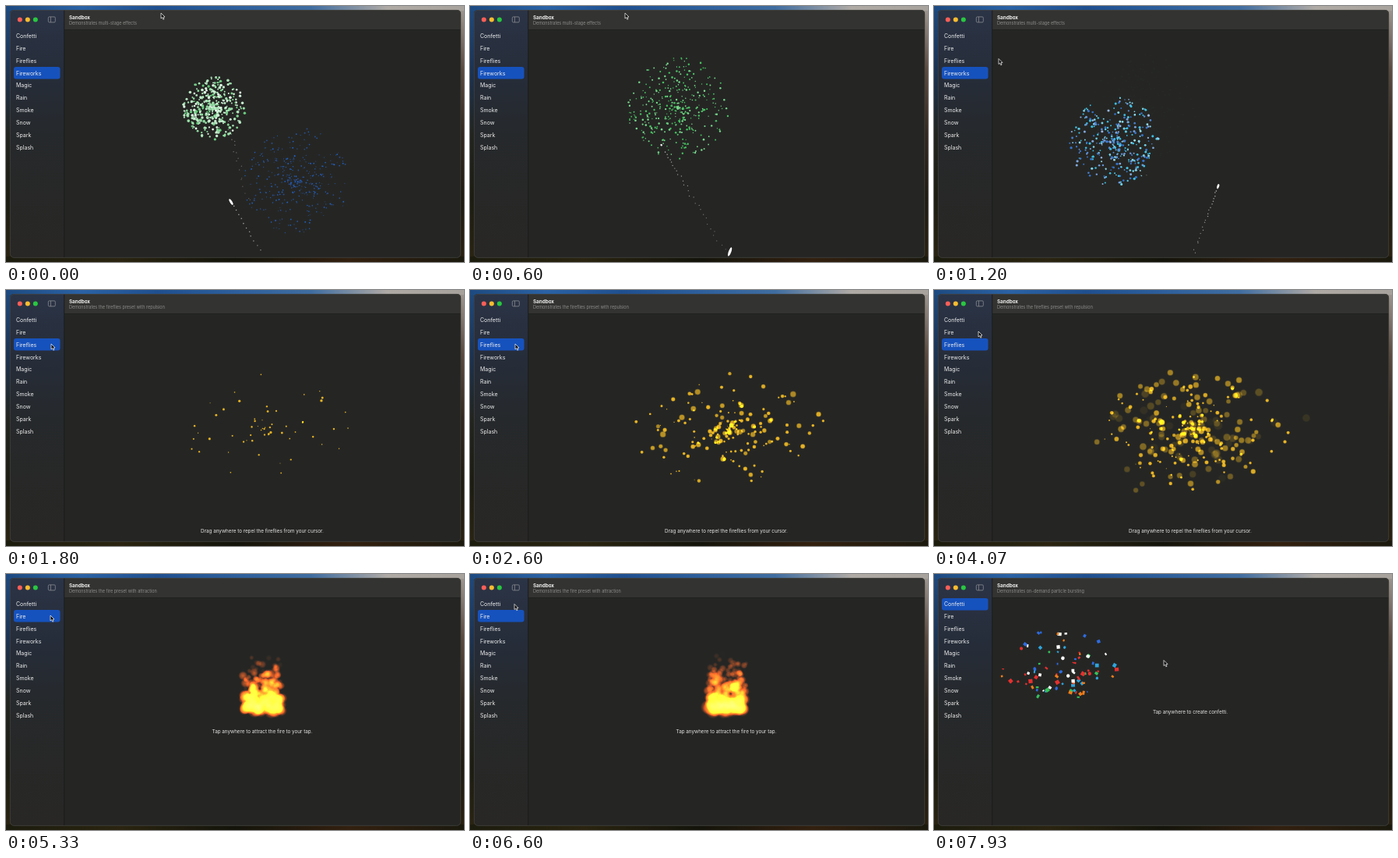
Recreate the animation shown at these times as an HTML page with a canvas. Size 588 by 328 pixels, loop 8000 ms.

```html
<!DOCTYPE html>
<html lang="en">
<head>
<meta charset="utf-8">
<title>Particle sandbox</title>
<style>
  html, body { margin: 0; width: 100%; height: 100%; overflow: hidden; background: #1c1c0e; }
  canvas { display: block; }
</style>
</head>
<body>
<canvas id="stage" width="588" height="328"></canvas>
<script>
const W = 588, H = 328, LOOP = 8000, TAU = Math.PI * 2;
const ctx = document.getElementById('stage').getContext('2d');
const FONT = 'Inter, "Liberation Sans", sans-serif';
const MENU = ['Confetti', 'Fire', 'Fireflies', 'Fireworks', 'Magic', 'Rain', 'Smoke', 'Snow', 'Spark', 'Splash'];

const SCENES = [
  { start: 0, row: 3, sub: 'Demonstrates multi-stage effects', draw: drawFireworks },
  { start: 1400, row: 2, sub: 'Demonstrates the fireflies preset with repulsion', draw: drawFireflies,
    hint: 'Drag anywhere to repel the fireflies from your cursor.', hintY: 309 },
  { start: 4230, row: 1, sub: 'Demonstrates the fire preset with attraction', draw: drawFire,
    hint: 'Tap anywhere to attract the fire to your tap.', hintY: 201.5 },
  { start: 6750, row: 0, sub: 'Demonstrates on-demand particle bursting', draw: drawConfetti,
    hint: 'Tap anywhere to create confetti.', hintY: 177 },
];

// time, x, y of the pointer tip
const POINTER = [
  [0, 199, 9], [930, 199, 9], [1200, 83, 67.5], [1360, 58, 69], [3380, 58, 69], [3600, 57, 53],
  [6300, 57, 53], [6480, 57, 38.5], [7070, 57, 38.5], [7330, 360, 168], [7600, 158, 168], [7900, 295, 110.5],
];

const clamp = (v, lo = 0, hi = 1) => Math.min(hi, Math.max(lo, v));
const lerp = (a, b, k) => a + (b - a) * k;
const rgb = c => `rgb(${c.map(Math.round).join(',')})`;
const mix = (a, b, k) => a.map((v, i) => lerp(v, b[i], k));

// Seeded random number in 0..1 for particle i, property k.
function rnd(i, k) {
  let h = Math.imul(i + 1, 374761393) ^ Math.imul(k + 7, 668265263);
  h = Math.imul(h ^ (h >>> 13), 1274126177);
  h = Math.imul(h ^ (h >>> 16), 2246822519);
  return ((h ^ (h >>> 15)) >>> 0) / 4294967296;
}

function disc(x, y, r, fill) {
  ctx.fillStyle = fill;
  ctx.beginPath();
  ctx.arc(x, y, r, 0, TAU);
  ctx.fill();
}

function box(x, y, w, h, r) {
  ctx.beginPath();
  ctx.roundRect(x, y, w, h, r);
}

function shade(x, y, w, h, colors, vertical) {
  const g = vertical ? ctx.createLinearGradient(0, y, 0, y + h) : ctx.createLinearGradient(x, 0, x + w, 0);
  colors.forEach((c, i) => g.addColorStop(i / (colors.length - 1), c));
  ctx.fillStyle = g;
  ctx.fillRect(x, y, w, h);
}

function label(text, x, y, size, color, weight = 400, align = 'left') {
  ctx.font = `${weight} ${size}px ${FONT}`;
  ctx.textAlign = align;
  ctx.textBaseline = 'alphabetic';
  ctx.fillStyle = color;
  ctx.fillText(text, x, y + size * 0.36);
}

function makeSprite(inner, outer) {
  const c = document.createElement('canvas');
  c.width = c.height = 32;
  const g = c.getContext('2d');
  const fade = g.createRadialGradient(16, 16, 0, 16, 16, 16);
  fade.addColorStop(0, `rgba(${inner},1)`);
  fade.addColorStop(0.55, `rgba(${outer},.75)`);
  fade.addColorStop(1, `rgba(${outer},0)`);
  g.fillStyle = fade;
  g.fillRect(0, 0, 32, 32);
  return c;
}
const flame = makeSprite('165,60,7', '150,44,4');

function stamp(sprite, x, y, r) {
  ctx.drawImage(sprite, x - r, y - r, r * 2, r * 2);
}

/* ---------- fireworks ---------- */

const FLIGHT = 1000;
const SHELLS = [
  { x: 373, y: 224, burst: -1200, colors: [[35, 105, 215], [45, 85, 165]] },
  { x: 267, y: 131, burst: -280, colors: [[70, 190, 95], [120, 215, 140]] },
  { x: 231, y: 173, burst: 640, colors: [[60, 190, 225], [55, 115, 200]] },
  { x: 360, y: 202, burst: 1560, colors: [[230, 90, 90], [240, 150, 150]] },
];

function shellPath(shell, k) {
  const f = 1 - (1 - k) ** 1.5;
  return [lerp(331, shell.x + 14, f), lerp(322, shell.y + 4, f)];
}

function drawTrail(shell, t, seed) {
  const launch = shell.burst - FLIGHT;
  for (let i = 0; i < 28; i++) {
    const k = 0.04 + 0.81 * i / 28;
    const age = (t - launch - k * FLIGHT) / 1020;
    if (age < 0 || age > 1) continue;
    const [x, y] = shellPath(shell, k);
    const spread = 1 + age * 6;
    ctx.globalAlpha = 0.75 * (1 - age * 0.5);
    disc(x + (rnd(i, seed) - 0.5) * spread, y + (rnd(i, seed + 1) - 0.5) * spread, 0.8 - age * 0.25, '#dedede');
  }
}

function drawRocket(shell, t) {
  const k = (t - shell.burst) / FLIGHT + 1;
  if (k < 0 || k >= 1) return;
  const [x, y] = shellPath(shell, k);
  const [px, py] = shellPath(shell, k - 0.02);
  ctx.globalAlpha = 1;
  ctx.fillStyle = '#fff';
  ctx.beginPath();
  ctx.ellipse(x, y, lerp(6.2, 1.2, k), lerp(1.7, 1.2, k), Math.atan2(y - py, x - px), 0, TAU);
  ctx.fill();
}

function drawBurst(shell, t, seed) {
  const age = t - shell.burst, life = age / 1500;
  if (life < 0 || life > 1) return;
  const reach = 70 * (1 - Math.exp(-age / 330));
  for (let i = 0; i < 360; i++) {
    const a = rnd(i, seed) * TAU;
    const r = reach * rnd(i, seed + 1) ** 0.8;
    const tint = clamp(age / 750 + rnd(i, seed + 2) * 0.75 - 0.25);
    const size = 1.65 * (1 - life * 0.65) * (0.6 + 0.7 * rnd(i, seed + 3));
    ctx.globalAlpha = Math.min(1, 4 * (1 - life));
    disc(shell.x + Math.cos(a) * r, shell.y + Math.sin(a) * r, size, rgb(mix([255, 255, 255], shell.colors[i % 2], tint)));
  }
}

function drawFireworks(t) {
  SHELLS.forEach((shell, n) => {
    const seed = 20 + n * 10;
    drawTrail(shell, t, seed + 5);
    drawRocket(shell, t);
    drawBurst(shell, t, seed);
  });
}

/* ---------- continuous emitters ---------- */

// Calls fn(index, age) for every particle alive at the elapsed time (ms).
function eachAlive(elapsed, rate, life, fn) {
  const last = Math.floor(elapsed * rate / 1000);
  const first = Math.max(0, Math.ceil((elapsed - life) * rate / 1000));
  for (let i = first; i <= last; i++) fn(i, elapsed - i * 1000 / rate);
}

function drawFireflies(t) {
  ctx.globalCompositeOperation = 'lighter';
  eachAlive(t, 140, 2000, (i, age) => {
    const k = age / 2000;
    const a = rnd(i, 1) * TAU, d = rnd(i, 2) ** 1.1, heading = rnd(i, 3) * TAU;
    const drift = 40 * rnd(i, 4) * k;
    const x = 329 + Math.cos(a) * d * 122 + Math.cos(heading) * drift;
    const y = 178 + Math.sin(a) * d * 70 + Math.sin(heading) * drift;
    const r = 0.5 + 5.6 * k ** 0.85 * (0.6 + 0.4 * rnd(i, 5));
    ctx.globalAlpha = Math.min(1, 1.7 * (1 - k));
    disc(x, y, r, 'rgba(205,148,0,.5)');
    disc(x, y, r * 0.82, 'rgba(225,165,0,.42)');
  });
}

function drawFire(t) {
  ctx.globalCompositeOperation = 'lighter';
  eachAlive(t, 300, 1000, (i, age) => {
    const k = age / 1000;
    const lift = 8 + 68 * rnd(i, 12) ** 1.15;
    const lean = (rnd(i, 13) - 0.5) * 0.2;
    const x = 329.5 + (rnd(i, 11) - 0.5) * 50 * (1 - 0.12 * k) + lean * lift * k;
    const y = 174.5 + (rnd(i, 15) - 0.5) * 5 - lift * k;
    ctx.globalAlpha = k < 0.6 ? 1 : (1 - k) / 0.4;
    stamp(flame, x, y, (6 + 4 * rnd(i, 14)) * (1 - 0.6 * k));
  });
}

/* ---------- confetti ---------- */

const PAPER = ['#e5302f', '#ffffff', '#2f6be0', '#35c25a', '#ee7d1c', '#2fa4dc', '#e5302f'];

function drawConfetti(t, now) {
  const s = (now - 7600) / 1000;
  if (s < 0) return;
  for (let i = 0; i < 88; i++) {
    const a = (rnd(i, 41) - 0.5) * 2.1;
    const speed = 70 + 245 * rnd(i, 42);
    const x = 158 + Math.sin(a) * speed * s;
    const y = 168 - Math.cos(a) * speed * s + 55 * s * s;
    const size = 2.4 + 2.8 * rnd(i, 43);
    ctx.save();
    ctx.translate(x, y);
    ctx.rotate(rnd(i, 44) * TAU + s * (rnd(i, 45) - 0.5) * 10);
    ctx.scale(1, 0.45 + 0.55 * Math.abs(Math.cos(rnd(i, 46) * TAU + s * 7)));
    const color = PAPER[Math.floor(rnd(i, 47) * PAPER.length)];
    if (i % 4 === 0) {
      disc(0, 0, size / 2, color);
    } else {
      ctx.fillStyle = color;
      ctx.fillRect(-size / 2, -size / 2, size, size);
    }
    ctx.restore();
  }
}

/* ---------- window ---------- */

function drawDesktop() {
  shade(0, 0, 294, H, ['#1f4a7d', '#1c3352', '#22241f', '#1c1c12', '#2a2412'], true);
  shade(294, 0, 294, H, ['#a09a94', '#5b4a40', '#33281f', '#1f1b12', '#29200f'], true);
  shade(0, 0, W, 6, ['#1d4a80', '#2a62a5', '#1f4f8f', '#2d5f9c', '#3f6da0', '#b0aaa5', '#a8a29c']);
  shade(0, 321, W, 7, ['#1c1c0e', '#2a2410', '#14140b', '#33200f', '#1b190e']);
}

function drawWindow(scene) {
  ctx.save();
  box(5, 5, 579, 317.5, 5);
  ctx.clip();
  ctx.fillStyle = '#252624';
  ctx.fillRect(5, 5, 579, 318);
  ctx.fillStyle = '#333331';
  ctx.fillRect(75, 5, 509, 25);
  ctx.fillStyle = '#20201f';
  ctx.fillRect(75, 30, 509, 0.8);
  shade(5, 5, 70, 318, ['#2b3446', '#262d3a', '#26292c', '#272827', '#282725'], true);
  ctx.fillStyle = '#191a1b';
  ctx.fillRect(74.3, 5, 0.9, 318);
  ctx.restore();

  ctx.strokeStyle = '#454542';
  ctx.lineWidth = 0.7;
  box(5.4, 5.4, 578.3, 317, 5);
  ctx.stroke();

  ['#fe5f57', '#febc2e', '#28c840'].forEach((c, i) => disc(17.8 + i * 10, 17.5, 3, c));
  ctx.strokeStyle = '#8a8d92';
  ctx.lineWidth = 0.8;
  box(54.3, 13.9, 9, 7, 1.3);
  ctx.moveTo(57.4, 13.9);
  ctx.lineTo(57.4, 20.9);
  ctx.stroke();

  ctx.fillStyle = '#1652bd';
  box(10, Math.round(30.5 + scene.row * 15.83), 59.5, 15.6, 3);
  ctx.fill();
  MENU.forEach((name, i) => label(name, 13, 38.6 + i * 15.83, 7, '#eeeeee'));

  label('Sandbox', 81, 14.6, 6.3, '#f0f0ee', 700);
  label(scene.sub, 81, 21.8, 5.5, '#8c8c8a');
}

function drawPointer(t) {
  const n = POINTER.findIndex(p => p[0] > t);
  const to = POINTER[n < 0 ? POINTER.length - 1 : n];
  const from = n < 0 ? to : POINTER[n - 1];
  const k = n < 0 ? 1 : (t - from[0]) / (to[0] - from[0]);
  const e = k * k * (3 - 2 * k);
  ctx.save();
  ctx.translate(lerp(from[1], to[1], e), lerp(from[2], to[2], e));
  ctx.beginPath();
  [[0, 0], [0, 7], [1.6, 5.6], [2.8, 8.2], [4, 7.7], [2.9, 5.2], [5, 5]].forEach(p => ctx.lineTo(...p));
  ctx.closePath();
  ctx.fillStyle = '#0c0c0c';
  ctx.fill();
  ctx.strokeStyle = '#e8e8e8';
  ctx.lineWidth = 0.8;
  ctx.lineJoin = 'round';
  ctx.stroke();
  ctx.restore();
}

function render(t) {
  const scene = SCENES.filter(s => s.start <= t).pop();
  drawDesktop();
  drawWindow(scene);
  if (scene.hint) label(scene.hint, 329, scene.hintY, 6.3, '#e6e6e4', 400, 'center');
  ctx.save();
  ctx.beginPath();
  ctx.rect(75, 31, 508, 290);
  ctx.clip();
  scene.draw(t - scene.start, t);
  ctx.restore();
  drawPointer(t);
}

const origin = performance.now();
function tick() {
  render((performance.now() - origin) % LOOP);
  requestAnimationFrame(tick);
}
tick();
</script>
</body>
</html>
```
